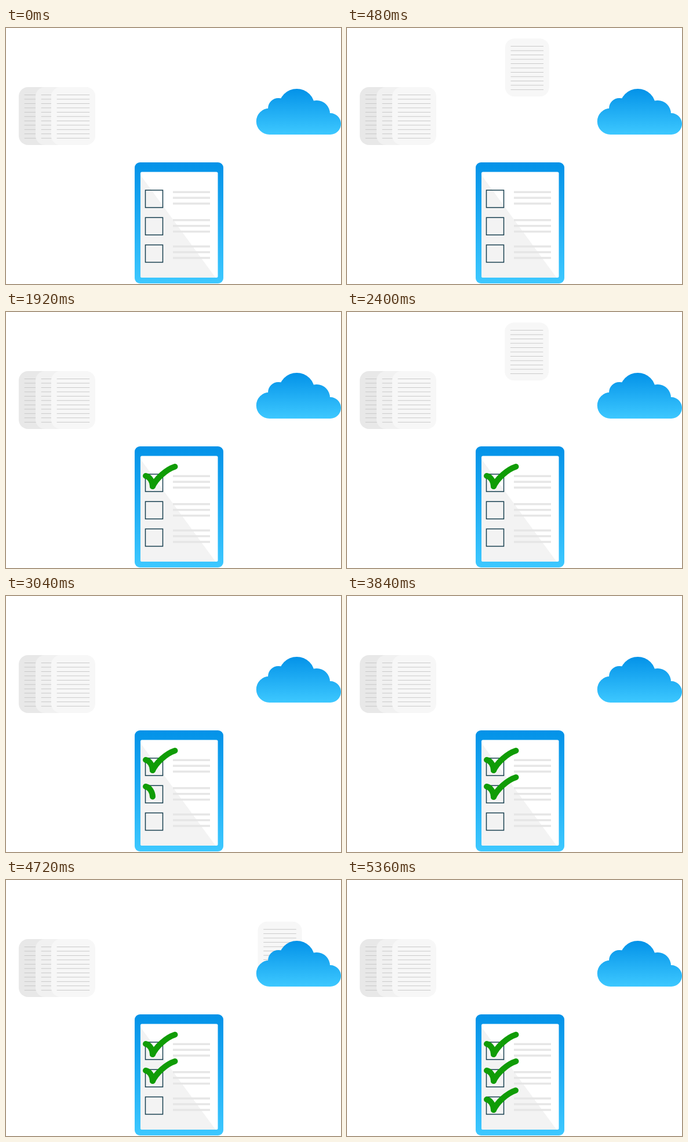
Animation, 578 px wide and 442 px high, one loop 5.76 s. Source, as an HTML page with a canvas:

```html
<!DOCTYPE html>
<html lang="en">
<head>
<meta charset="utf-8">
<title>Documents to cloud checklist</title>
<style>
  html, body { margin: 0; width: 100%; height: 100%; overflow: hidden; background: #fff; }
  canvas { display: block; }
</style>
</head>
<body>
<canvas width="578" height="442"></canvas>
<script>
const ctx = document.querySelector('canvas').getContext('2d');
const LOOP = 5760;
const CYCLE = 1921.5;
const FLIGHT = 960;
const ROW_SHIFTS = [0, 46, 96];

function makePath(d) {
  const el = document.createElementNS('http://www.w3.org/2000/svg', 'path');
  el.setAttribute('d', d);
  return { el, shape: new Path2D(d), length: el.getTotalLength() };
}

const flight = makePath('M0 0C56-56 120-84 205-84C285-84 342-84 372 4');
const tickDown = makePath('M241 283C248 284 253 293 253 301');
const tickUp = makePath('M253 301C259 288 276 272 291.5 267');

const clamp = v => Math.min(1, Math.max(0, v));

function verticalGradient(top, bottom) {
  const g = ctx.createLinearGradient(0, top, 0, bottom);
  g.addColorStop(0, '#0392e8');
  g.addColorStop(1, '#3dc8ff');
  return g;
}

const tabletFill = verticalGradient(232, 441);
const cloudFill = verticalGradient(105, 184);

function roundRect(x, y, w, h, r, fill) {
  ctx.fillStyle = fill;
  ctx.beginPath();
  ctx.roundRect(x, y, w, h, r);
  ctx.fill();
}

function drawSheet(x, y, fill) {
  roundRect(x, y, 76, 100, 16, fill);
  ctx.fillStyle = '#c4c4c4';
  for (let i = 0; i < 11; i++) ctx.fillRect(x + 9.7, y + 13 + i * 7.48, 56.5, 0.9);
}

function drawStack() {
  drawSheet(22, 102, '#e8e8e8');
  drawSheet(51, 102, '#f1f1f1');
  drawSheet(78, 102, '#f7f7f7');
}

function drawCloud() {
  const lobes = [[454.5, 161.2, 22.7], [470, 139, 18], [501.7, 136, 31], [536, 148, 23], [559.5, 165.5, 18.5]];
  ctx.fillStyle = cloudFill;
  ctx.beginPath();
  for (const [x, y, r] of lobes) {
    ctx.moveTo(x + r, y);
    ctx.arc(x, y, r, 0, Math.PI * 2);
  }
  ctx.rect(454.5, 148, 105, 36);
  ctx.fill();
}

function drawTablet() {
  roundRect(222, 232, 153, 209, 9, tabletFill);
  roundRect(232, 248.5, 133.5, 182.5, 2.5, '#fff');
  ctx.fillStyle = '#f3f3f3';
  ctx.beginPath();
  ctx.moveTo(232, 254);
  ctx.lineTo(361.5, 431);
  ctx.lineTo(234, 431);
  ctx.lineTo(232, 429);
  ctx.fill();

  ctx.fillStyle = '#e6e6e6';
  for (const top of [281.6, 330, 375.4])
    for (let i = 0; i < 3; i++) ctx.fillRect(288, top + i * 9.9, 64, 3.5);

  ctx.strokeStyle = '#173f4f';
  ctx.lineWidth = 1.5;
  for (const top of [280, 327.3, 374.5]) ctx.strokeRect(240.5, top, 30, 30);
}

function strokePart(path, part) {
  if (part <= 0) return;
  ctx.setLineDash([path.length * part, path.length * 2]);
  ctx.stroke(path.shape);
}

function drawTick(time, shift) {
  ctx.save();
  ctx.translate(0, shift);
  ctx.strokeStyle = '#109c06';
  ctx.lineWidth = 10;
  ctx.lineCap = 'round';
  ctx.lineJoin = 'round';
  strokePart(tickDown, 1 - (1 - clamp((time - 940) / 260)) ** 3);
  strokePart(tickUp, clamp((time - 1270) / 250));
  ctx.restore();
}

function draw(time) {
  ctx.fillStyle = '#fff';
  ctx.fillRect(0, 0, 578, 442);
  drawStack();

  const cycle = Math.floor(time / CYCLE);
  const phase = time - cycle * CYCLE;
  if (phase < FLIGHT - 10) {
    const p = flight.el.getPointAtLength(flight.length * phase / FLIGHT);
    drawSheet(78 + p.x, 102 + p.y, '#f7f7f7');
  }

  drawCloud();
  drawTablet();
  ROW_SHIFTS.forEach((shift, i) => drawTick(time - i * CYCLE, shift));
}

const start = performance.now();
function tick() {
  const time = (performance.now() - start) % LOOP;
  draw(Math.floor(time / 80) * 80);
  requestAnimationFrame(tick);
}
tick();
</script>
</body>
</html>
```
